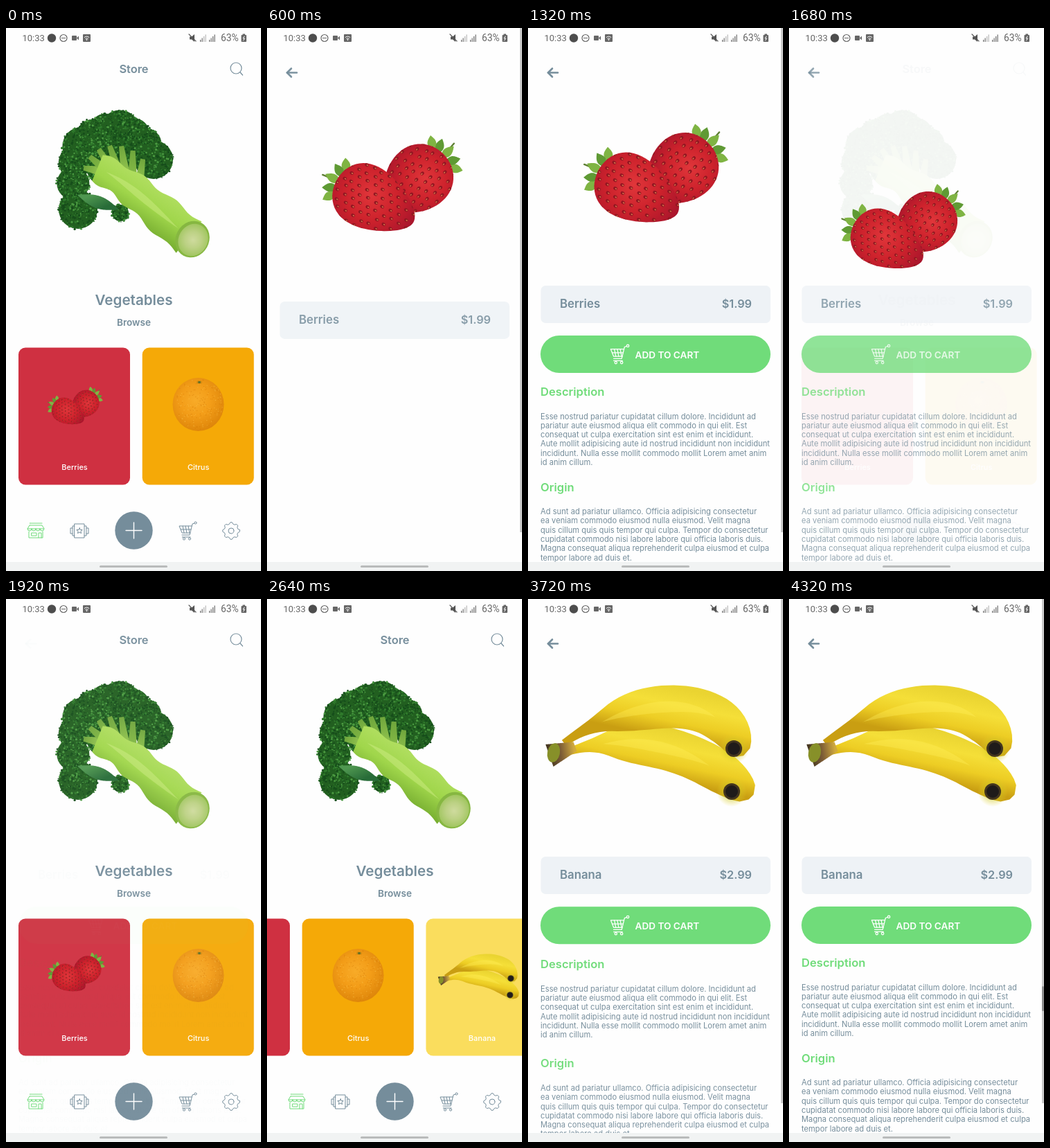
An HTML page with a canvas for the animation above (4.44 s loop, 368 by 784 pixels).

```html
<!DOCTYPE html>
<html lang="en">
<head>
<meta charset="utf-8">
<title>Store</title>
<style>
html, body { margin: 0; width: 100%; height: 100%; overflow: hidden; background: #fefefe; }
canvas { display: block; width: 100vw; height: 100vh; }
</style>
</head>
<body>
<canvas id="stage"></canvas>
<script>
const W = 368, H = 784, LOOP = 4440, STEP = 120, TAU = Math.PI * 2;
const SLATE = '#758d9b', GREEN = '#70dc7a', PAGE = '#fefefe', STATUS = '#666';
const BERRY_START = 180, BACK_START = 1472, BANANA_START = 2929, SLIDE = 540;

const canvas = document.getElementById('stage');
const ctx = canvas.getContext('2d');
const dpr = window.devicePixelRatio || 1;
canvas.width = W * dpr;
canvas.height = H * dpr;

const clamp = u => Math.max(0, Math.min(1, u));
const mix = (a, b, u) => a + (b - a) * u;
const easeOut = u => 1 - (1 - clamp(u)) ** 3;
const easeInOut = u => {
  u = clamp(u);
  return u < .5 ? 4 * u ** 3 : 1 - 4 * (1 - u) ** 3;
};
const random = seed => () => (seed = (seed * 16807) % 2147483647) / 2147483647;

// Point on a cubic curve.
const curve = (a, b, c, d) => u => [0, 1].map(k =>
  a[k] * (1 - u) ** 3 + 3 * b[k] * u * (1 - u) ** 2 + 3 * c[k] * u * u * (1 - u) + d[k] * u ** 3);
const straight = (a, b) => u => [mix(a[0], b[0], u), mix(a[1], b[1], u)];
const polar = (x, y, r, a) => [x + r * Math.cos(a), y + r * Math.sin(a)];

// Closed outline around a curve; half(u) is half its width.
function taper(at, half) {
  const path = new Path2D(), n = 40;
  for (let i = 0; i <= 2 * n + 1; i++) {
    const side = i <= n ? 1 : -1;
    const u = (i <= n ? i : 2 * n + 1 - i) / n;
    const [x, y] = at(u), [x0, y0] = at(u - .01), [x1, y1] = at(u + .01);
    path.lineTo(...polar(x, y, half(u) * side, Math.atan2(y1 - y0, x1 - x0) - Math.PI / 2));
  }
  path.closePath();
  return path;
}

function fill(path, style) {
  ctx.fillStyle = style;
  ctx.fill(path);
}

function stops(gradient, colors) {
  colors.forEach((c, i) => gradient.addColorStop(i / (colors.length - 1), c));
  return gradient;
}
const linear = (x0, y0, x1, y1, ...colors) => stops(ctx.createLinearGradient(x0, y0, x1, y1), colors);
const radial = (x, y, r, ...colors) => stops(ctx.createRadialGradient(x, y, 0, x, y, r), colors);

function disc(x, y, r, style, ry = r, turn = 0) {
  ctx.beginPath();
  ctx.ellipse(x, y, r, ry, turn, 0, TAU);
  ctx.fillStyle = style;
  ctx.fill();
}

function arc(x, y, r, from = 0, to = TAU) {
  ctx.beginPath();
  ctx.arc(x, y, r, from, to);
  ctx.stroke();
}

function box(x, y, w, h, r, style) {
  ctx.beginPath();
  ctx.roundRect(x, y, w, h, r);
  ctx.fillStyle = style;
  ctx.fill();
}

function line(...p) {
  ctx.beginPath();
  for (let i = 0; i < p.length; i += 2) ctx.lineTo(p[i], p[i + 1]);
  ctx.stroke();
}

// Closed polygon with a radius per corner.
function wheel(count, radius, turn) {
  ctx.beginPath();
  for (let i = 0; i < count; i++) ctx.lineTo(...polar(0, 0, radius(i), i * TAU / count + turn));
  ctx.closePath();
  ctx.stroke();
}

function pen(color, width) {
  ctx.strokeStyle = color;
  ctx.lineWidth = width;
  ctx.lineCap = ctx.lineJoin = 'round';
}

function text(str, x, y, size, weight, color, align = 'left', family = 'Inter') {
  ctx.font = `${weight} ${size}px ${family}, sans-serif`;
  ctx.textAlign = align;
  ctx.fillStyle = color;
  ctx.fillText(str, x, y);
}

function group(draw, x = 0, y = 0, scale = 1, alpha = 1) {
  ctx.save();
  ctx.translate(x, y);
  ctx.scale(scale, scale);
  ctx.globalAlpha *= alpha;
  draw();
  ctx.restore();
}

// ---- Produce ----

const crown = curve([104, 262], [66, 138], [186, 112], [213, 190]);
const trunk = curve([132, 202], [175, 220], [212, 260], [264, 302]);
const stalk = taper(trunk, u => 20 + 9 * u + 2.5 * Math.sin(u * 19));
const leaf = taper(straight([103, 241], [163, 262]), u => 9 * Math.sin(Math.PI * u));

// Disc of seeded florets with a frilled rim.
function floret(x, y, r, rnd) {
  disc(x, y, r, '#225f20');
  for (let i = 0; i < r * 9; i++) {
    const [px, py] = polar(x, y, Math.sqrt(rnd()) * (r + 1), rnd() * TAU);
    const tone = rnd();
    disc(px, py, .7 + rnd(), tone < .45 ? '#164d1b' : tone < .8 ? '#2f7a2c' : '#4b9a41');
  }
}

function broccoli() {
  const rnd = random(71);
  floret(165, 267, 12, rnd);
  floret(150, 195, 36, rnd);
  for (let i = 0; i <= 9; i++) floret(...crown(i / 9), 25 + 3 * Math.cos(i * 2.1), rnd);

  for (let i = 0; i < 7; i++) {
    const [x, y] = crown(.2 + i * .115);
    const root = trunk(.1 + i * .06);
    const from = straight([x, y], root)(.3);
    fill(taper(straight(from, root), u => mix(3.5, 8, u)), linear(...from, ...root, '#6fa63c', i % 2 ? '#8fc34a' : '#a3d258'));
  }
  fill(stalk, linear(222, 225, 184, 285, '#b2df62', '#a0d64b', '#76ad30'));
  fill(taper(u => trunk(.1 + u * .8), u => 5 * Math.sin(Math.PI * u)), 'rgba(208,238,135,.45)');
  disc(269, 305, 24, '#86b741', 27, .5);
  disc(270, 306, 21, radial(270, 306, 24, '#cfdb9e', '#bcd184', '#9fc55e'), 24, .5);
  fill(leaf, linear(125, 240, 135, 262, '#4f9750', '#286c38'));
}

// Strawberry outline: an ellipse that narrows toward its tip.
function berry(x, y, long, wide, narrow, turn, seed) {
  ctx.save();
  ctx.translate(x, y);
  ctx.rotate(turn);
  pen('#5f8034', 2.5);
  line(-long + 4, 0, -long - 22, 3);
  for (let i = -2; i <= 2; i++) {
    const from = [8 - long, i * 8], to = polar(...from, 27 - 2 * Math.abs(i), Math.PI - i * .5);
    fill(taper(straight(from, to), u => 6.5 * Math.sin(Math.PI * u)), i % 2 ? '#5f9a34' : '#7fb443');
  }
  const body = new Path2D();
  for (let a = 0; a < TAU; a += .1) {
    body.lineTo(long * Math.cos(a), wide * Math.sin(a) * (1 - narrow * Math.cos(a)));
  }
  fill(body, radial(-10, -6, long * 1.2, '#e0363a', '#cd222c', '#a5142c'));
  ctx.clip(body);
  const rnd = random(seed);
  for (let row = -5; row <= 5; row++) {
    for (let col = -5; col <= 5; col++) {
      const sx = col * 13 + (row & 1) * 6.5 + rnd() * 3, sy = row * 11 + rnd() * 3;
      disc(sx, sy, 3, '#911722', 2.4);
      disc(sx + 1, sy, 1.4, '#d06a45', 1);
    }
  }
  ctx.restore();
}

function berries() {
  berry(222, 204, 54, 48, .12, 2.4, 5);
  berry(159, 236, 65, 45, .32, .5, 9);
}

function orange() {
  const rnd = random(19);
  disc(0, 0, 37, radial(-4, -6, 44, '#f8ab28', '#f39d18', '#df870b'), 38.5);
  for (let i = 0; i < 200; i++) {
    disc(...polar(0, 0, Math.sqrt(rnd()) * 36, rnd() * TAU), .7, i % 2 ? 'rgba(205,112,0,.4)' : 'rgba(255,205,90,.4)');
  }
  disc(1.5, -32, 4, '#d38c13', 2.5);
  disc(1.5, -32, 2, '#5d6f28', 1.4);
}

// Thin neck, full middle, rounded end.
const plump = u => 5 + 26 * easeInOut(u / .6 + .12) * Math.sqrt(1 - clamp((u - .75) / .25) ** 2);

function banana(spine, tipX, tipY) {
  const half = plump;
  fill(taper(spine, half), linear(205, tipY - 90, 190, tipY - 18, '#ead431', '#f5df38', '#edcd24', '#c99e12'));
  fill(taper(u => spine(.2 + u * .55), u => 8 * Math.sin(Math.PI * u)), 'rgba(255,238,90,.35)');
  disc(tipX, tipY, 22, radial(tipX, tipY, 22, 'rgba(150,165,25,.8)', 'rgba(205,200,35,.5)', 'rgba(230,210,40,0)'));
  disc(tipX, tipY, 12, '#43351f');
  disc(tipX, tipY, 9, '#1f1b1a');
}

function bananas() {
  banana(curve([54, 222], [140, 190], [250, 213], [322, 286]), 294, 278);
  banana(curve([52, 208], [130, 150], [290, 120], [306, 227]), 297, 216);
  fill(taper(straight([68, 213], [31, 226]), u => mix(7, 17, u)), linear(28, 220, 66, 214, '#43351f', '#7d5d36', '#cfa93e'));
  disc(37, 222, 9, '#879029', 14, .2);
}

// cx, cy: place on the detail page; x, y, scale: place on its card.
const items = {
  berries: { name: 'Berries', price: '$1.99', draw: berries, cx: 181, cy: 216, x: 98.5, y: 547.5, scale: .383 },
  banana: { name: 'Banana', price: '$2.99', draw: bananas, cx: 178.5, cy: 210, x: 452, y: 545.5, scale: .387 }
};

function produce(item, p, scroll) {
  group(() => {
    ctx.translate(-item.cx, -item.cy);
    item.draw();
  }, mix(item.x - scroll, item.cx, p), mix(item.y, item.cy, p), mix(item.scale, 1, p));
}

// ---- Icons, centred on the origin ----

function cart() {
  arc(11.5, -11.5, 1.6);
  line(10, -11, 7, -10, 3, 6, -8, 6);
  line(6, -7, -12, -7, -8, 3, 4, 3);
  line(-10, -2, 5, -2);
  for (let x = -7; x < 4; x += 4) line(x, -7, x + 2, 3);
  line(-8, 9, 4, 9);
  arc(-5, 11.5, 1.6);
  arc(3, 11.5, 1.6);
}

function shop() {
  line(-9, -11, 9, -11);
  line(-9, -8, 9, -8, 12, -3, -12, -3, -9, -8);
  for (let x = -9; x <= 9; x += 6) arc(x, -3, 3, 0, Math.PI);
  line(-10, 1, -10, 10, 10, 10, 10, 1);
  ctx.strokeRect(-6, 3, 7, 4);
  line(4, 10, 4, 3, 8, 3, 8, 10);
}

function ticket() {
  ctx.strokeRect(-7, -10, 14, 20);
  for (const s of [-1, 1]) {
    line(s * 7, -7, s * 10, -7, s * 10, 7, s * 7, 7);
    line(s * 10, -4, s * 13, -4, s * 13, 4, s * 10, 4);
  }
  wheel(10, i => i % 2 ? 2 : 4.4, -Math.PI / 2);
}

function gear() {
  arc(0, 0, 4);
  wheel(32, i => i % 4 < 2 ? 12.3 : 10, -Math.PI / 32);
}

// ---- Screens ----

function statusBar() {
  text('10:33', 23.5, 19, 13, 400, STATUS, 'left', 'Roboto');
  disc(66, 14.5, 6.2, '#4d4d4d');
  pen(STATUS, 1.2);
  arc(83, 14.5, 5);
  line(80.5, 14.5, 85.5, 14.5);
  box(95, 11, 7, 7, 1, STATUS);
  fill(new Path2D('M102 14.5L105 11.5V17.5Z'), STATUS);
  box(111, 9, 11, 11, 1, STATUS);
  pen('#fff', 1);
  for (const r of [2.5, 5]) arc(116.5, 17.2, r, -2.3, -.84);
  disc(116.5, 17, .9, '#fff');
  fill(new Path2D('M265 12.5H268L272 9V20L268 16.5H265Z'), '#555');
  pen('#555', 1.2);
  line(264, 9, 274, 19);
  for (const x of [280, 293]) {
    for (let i = 0; i < 4; i++) box(x + i * 2.5, 17 - i * 2.5, 1.3, 3 + i * 2.5, 0, x > 290 || i < 2 ? '#777' : '#bbb');
  }
  text('63%', 310, 19.3, 13.8, 400, STATUS, 'left', 'Roboto');
  box(341.5, 8.5, 3.5, 2, 0, STATUS);
  box(339.5, 10, 7.5, 10, 1, STATUS);
  pen('#fff', 1);
  line(344, 12, 342, 15, 344.5, 15, 342.5, 18);
}

function card(i, scroll, color, name) {
  const x = 18 + i * 178.7 - scroll;
  box(x, 461.5, 161, 198, 10, color);
  text(name, x + 81, 638, 11, 500, '#fff', 'center');
}

function store(scroll, moving) {
  text('Store', 184.5, 65, 16.4, 600, SLATE, 'center');
  pen(SLATE, 1.2);
  arc(332, 58, 8);
  line(338, 64, 341.5, 68);
  broccoli();
  text('Vegetables', 184.5, 399.5, 20.6, 600, SLATE, 'center');
  text('Browse', 184.5, 430, 13.6, 600, SLATE, 'center');

  card(0, scroll, '#cf3041', 'Berries');
  card(1, scroll, '#f5a907', 'Citrus');
  card(2, scroll, '#fadd5d', 'Banana');
  group(orange, 277.5 - scroll, 543.5);
  for (const item of Object.values(items)) if (item !== moving) produce(item, 0, scroll);

  pen(GREEN, 1);
  group(shop, 43, 726);
  pen(SLATE, 1);
  [ticket, null, cart, gear].forEach((icon, i) => icon && group(icon, 106 + i * 78 - (i === 3 ? 15 : 0), 726));
  disc(184.5, 725.5, 27.2, SLATE);
  pen('#fff', 1.4);
  line(173, 725.5, 196, 725.5);
  line(184.5, 714, 184.5, 737);
}

const description = [
  'Esse nostrud pariatur cupidatat cillum dolore. Incididunt ad',
  'pariatur aute eiusmod aliqua elit commodo in qui elit. Est',
  'consequat ut culpa exercitation sint est enim et incididunt.',
  'Aute mollit adipisicing aute id nostrud incididunt non incididunt',
  'incididunt. Nulla esse mollit commodo mollit Lorem amet anim',
  'id anim cillum.'];
const origin = [
  'Ad sunt ad pariatur ullamco. Officia adipisicing consectetur',
  'ea veniam commodo eiusmod nulla eiusmod. Velit magna',
  'quis cillum quis quis tempor qui culpa. Tempor do consectetur',
  'cupidatat commodo nisi labore labore qui officia laboris duis.',
  'Magna consequat aliqua reprehenderit culpa eiusmod et culpa',
  'tempor labore ad duis et.'];

function section(title, lines, y) {
  text(title, 18, y, 16.6, 600, GREEN);
  lines.forEach((l, i) => text(l, 18, y + 33.5 + i * 13.3, 11.2, 400, SLATE));
}

function detail(item, age, shown) {
  const enter = (delay, draw) => {
    const e = easeOut((age - delay) / 400);
    if (e > 0) group(draw, 0, 106 * (1 - e), 1, Math.sqrt(e) * shown);
  };
  group(() => {
    pen(SLATE, 2.6);
    line(43, 64.5, 29, 64.5);
    line(35, 58.5, 29, 64.5, 35, 70.5);
  }, 0, 0, 1, shown);
  enter(260, () => {
    box(18.5, 372, 331.5, 54, 7, '#eef2f6');
    text(item.name, 46, 404, 16.8, 600, SLATE);
    text(item.price, 323, 404, 16.3, 600, SLATE, 'right');
  });
  enter(440, () => {
    box(18, 444, 332, 54, 27, GREEN);
    pen('#fff', 1.2);
    group(cart, 132, 471, 1.05);
    text('ADD TO CART', 154.5, 477, 13.6, 600, '#fff');
  });
  enter(500, () => section('Description', description, 531));
  enter(560, () => section('Origin', origin, 668.5));
}

function draw(t) {
  const first = t < 2100;
  const item = first ? items.berries : items.banana;
  const start = first ? BERRY_START : BANANA_START;
  const leave = first ? easeInOut((t - BACK_START) / SLIDE) : 0;
  const p = easeInOut((t - start) / SLIDE) - leave;
  const scroll = 146 * easeInOut((t - 2130) / 520);

  ctx.setTransform(dpr, 0, 0, dpr, 0, 0);
  box(0, 0, W, H, 0, PAGE);
  if (p < 1) store(scroll, p > 0 ? item : null);
  if (p > 0) {
    group(() => box(0, 0, W, H, 0, PAGE), 0, 0, 1, 1 - (1 - p) ** 2);
    detail(item, t - start, p);
    produce(item, p, scroll);
  }
  statusBar();
  if (t - start >= 180 && leave < .2) box(365, 0, 3, 728, 0, '#c8c8c8');
  if (t >= LOOP - STEP) box(365, 559, 3, 36, 1.5, '#8d8d8d');
  box(0, 771, W, 13, 0, '#f1f3f3');
  box(135, 776, 98, 3, 1.5, '#b9bbbb');
}

const begin = performance.now();
let last = -1;
function tick() {
  const t = Math.floor((performance.now() - begin) % LOOP / STEP) * STEP;
  if (t !== last) draw(last = t);
  requestAnimationFrame(tick);
}
tick();
</script>
</body>
</html>
```
